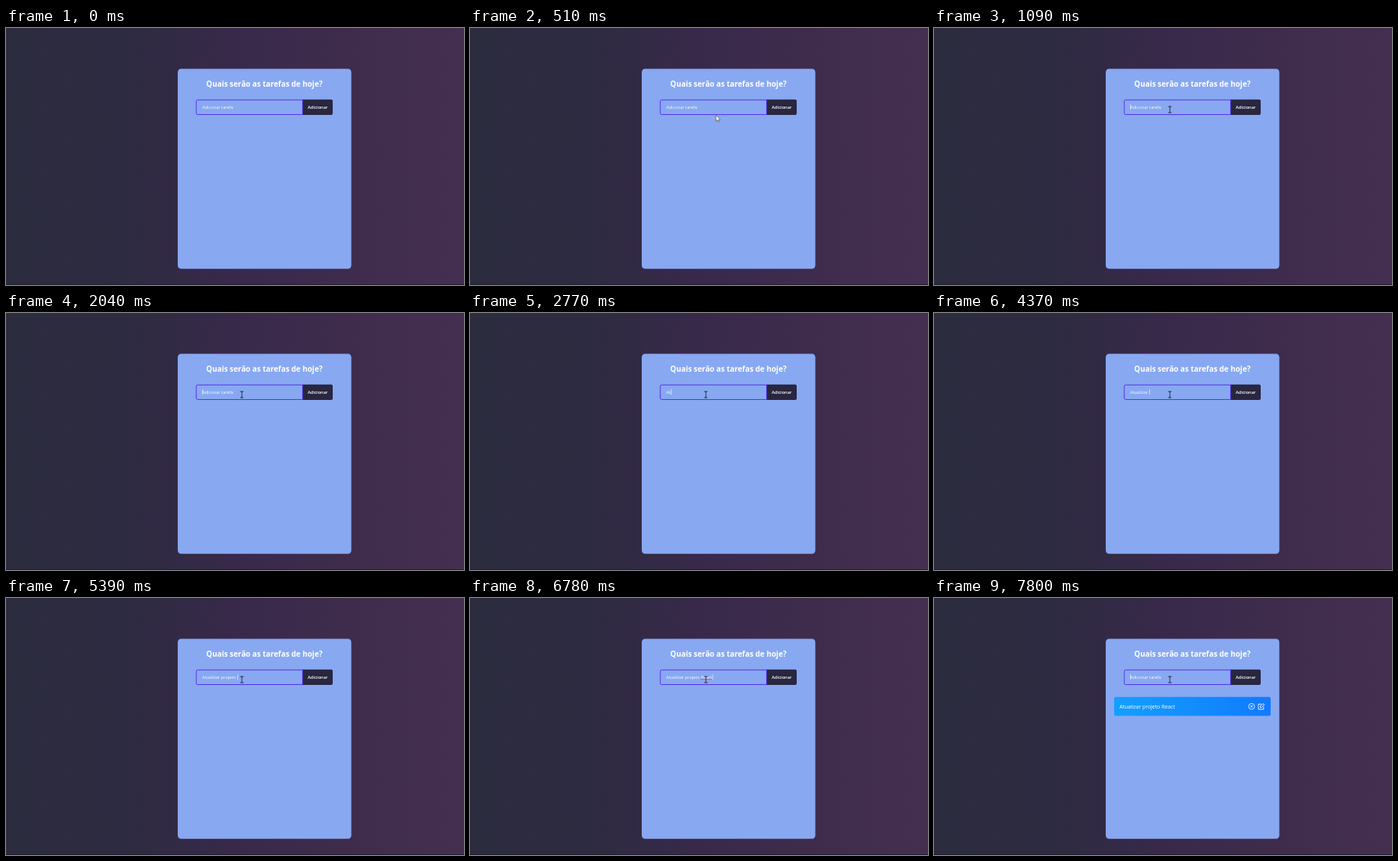
These frames come from a looping animation (600 by 337 pixels, 8 s). An HTML page with a canvas:

```html
<!DOCTYPE html>
<html lang="pt">
<head>
<meta charset="utf-8">
<title>Tarefas</title>
<style>
html, body { margin: 0; width: 100%; height: 100%; overflow: hidden; background: #2c2b40; }
canvas { display: block; width: 100vw; height: 100vh; }
</style>
</head>
<body>
<canvas id="stage"></canvas>
<script>
const W = 600, H = 337, LOOP = 8000;
const canvas = document.getElementById('stage');
const ctx = canvas.getContext('2d');
const FONT = '"Trebuchet MS", "Open Sans", "Noto Sans", sans-serif';

const TASK = 'Atualizar projeto React';
// time at which each character of TASK is typed
const KEYS = [2480, 2700, 2920, 3060, 3280, 3500, 3720, 3870, 4010, 4220,
  4440, 4590, 4740, 5030, 5100, 5250, 5320, 5390, 5610, 5690, 5830, 5970, 6190];
const ARRIVE = 800, FOCUS = 950, SUBMIT = 6850;
const FIELD_X = 257, FIELD_Y = 105.8;

function hGradient(x0, x1, ...colors) {
  const g = ctx.createLinearGradient(x0, 0, x1, 0);
  colors.forEach((c, i) => g.addColorStop(i / (colors.length - 1), c));
  return g;
}

function box(x, y, w, h, r, fill) {
  ctx.beginPath();
  ctx.roundRect(x, y, w, h, r);
  ctx.fillStyle = fill;
  ctx.fill();
}

function text(str, x, y, size, weight = 500, align = 'left') {
  ctx.font = `${weight} ${size}px ${FONT}`;
  ctx.textAlign = align;
  ctx.fillStyle = '#fff';
  ctx.fillText(str, x, y);
  return ctx.measureText(str).width;
}

function line(points, color, width) {
  ctx.beginPath();
  points.forEach(([x, y]) => ctx.lineTo(x, y));
  ctx.strokeStyle = color;
  ctx.lineWidth = width;
  ctx.stroke();
}

function drawPage() {
  ctx.fillStyle = hGradient(0, W, '#2c2c3f', '#2d2b41', '#38294a', '#3f2c4d', '#452f50');
  ctx.fillRect(0, 0, W, H);
  ctx.fillStyle = '#1f1b2b';
  ctx.fillRect(0, 336, W, 1);
  box(225, 53.5, 227.4, 262.2, 4.5, '#88a8f2');
  text('Quais serão as tarefas de hoje?', 338.5, 77.4, 9.9, 700, 'center');
  box(388.5, 93.8, 39.5, 20.2, [0, 2, 2, 0], '#29263f');
  text('Adicionar', 408.4, FIELD_Y, 5.7, 600, 'center');
  ctx.beginPath();
  ctx.roundRect(249.2, 94.3, 139.4, 19.2, [2, 0, 0, 2]);
  ctx.strokeStyle = '#5433ec';
  ctx.lineWidth = 1;
  ctx.stroke();
}

function squiggle(x0, x1) {
  const pts = [];
  for (let x = x0; x <= x1; x += 0.5) pts.push([x, 106.6 + 0.35 * Math.sin(x * 3)]);
  line(pts, '#e0323c', 0.8);
}

function drawField(t) {
  const count = t < SUBMIT ? KEYS.filter(k => k <= t).length : 0;
  let caretX = FIELD_X;
  if (count) {
    const typed = TASK.slice(0, count);
    caretX += text(typed, FIELD_X, FIELD_Y, 5.7) + 0.6;
    if (count > 2 && count < 9) squiggle(FIELD_X, caretX - 0.5);
    if (count > 20) squiggle(FIELD_X + ctx.measureText(TASK.slice(0, 18)).width, caretX - 0.5);
  } else {
    text('Adiconar tarefa', FIELD_X, FIELD_Y, 5.7);
  }
  if (caretOn(t)) {
    ctx.fillStyle = '#fff';
    ctx.fillRect(caretX, 100.2, 0.6, 6.8);
  }
}

function caretOn(t) {
  if (t < FOCUS) return false;
  if (t < KEYS[0]) return Math.floor((t - FOCUS) / 530) % 2 === 0;
  if (t < 6480) return true;
  return t >= 6700 && t < 7290 || t >= 7800;
}

function drawTask(t) {
  if (t < SUBMIT) return;
  box(236, 129.8, 205, 24.6, 2, hGradient(236, 441, '#149fff', '#117aff'));
  text(TASK, 243, 144.6, 6.9);

  ctx.beginPath();
  ctx.arc(416.1, 142.2, 3.9, 0, 7);
  ctx.strokeStyle = '#fff';
  ctx.lineWidth = 0.8;
  ctx.stroke();
  line([[414.6, 140.7], [417.6, 143.7]], '#fff', 0.9);
  line([[417.6, 140.7], [414.6, 143.7]], '#fff', 0.9);

  line([[429, 139.2], [425, 139.2], [425, 146], [431.8, 146], [431.8, 142.6]], '#fff', 0.9);
  line([[427.4, 143.7], [427.6, 141.9], [431.1, 138.4], [432.7, 140], [429.2, 143.5], [427.4, 143.7]],
    '#fff', 0.9);
}

function drawArrow(x, y) {
  ctx.beginPath();
  [[0, 0], [0, 8], [1.9, 6.3], [3.1, 9], [4.2, 8.5], [3, 5.9], [5.5, 5.7]]
    .forEach(([dx, dy]) => ctx.lineTo(x + dx, y + dy));
  ctx.closePath();
  ctx.fillStyle = '#fff';
  ctx.fill();
  ctx.strokeStyle = '#222';
  ctx.lineWidth = 0.5;
  ctx.stroke();
}

function drawIBeam(x, y) {
  const ink = '#1c1f33';
  line([[x, y - 4], [x, y + 4]], ink, 0.9);
  for (const dy of [-4, 4]) line([[x - 2.2, y + dy], [x + 2.2, y + dy]], ink, 0.9);
}

function drawPointer(t) {
  if (t < 150) return;
  const p = Math.min(1, (t - 150) / (ARRIVE - 150));
  const e = 1 - (1 - p) ** 3;
  const x = 460 + (309 - 460) * e;
  const y = 190 + (107 - 190) * e;
  const inField = x < 388 && y < 114;
  (inField ? drawIBeam : drawArrow)(x, y);
}

function resize() {
  const dpr = window.devicePixelRatio || 1;
  const w = Math.round(innerWidth * dpr), h = Math.round(innerHeight * dpr);
  if (canvas.width !== w || canvas.height !== h) {
    canvas.width = w;
    canvas.height = h;
  }
  ctx.setTransform(w / W, 0, 0, h / H, 0, 0);
}

const start = performance.now();
function draw() {
  const t = (performance.now() - start) % LOOP;
  resize();
  drawPage();
  drawField(t);
  drawTask(t);
  drawPointer(t);
  requestAnimationFrame(draw);
}
draw();
</script>
</body>
</html>
```
